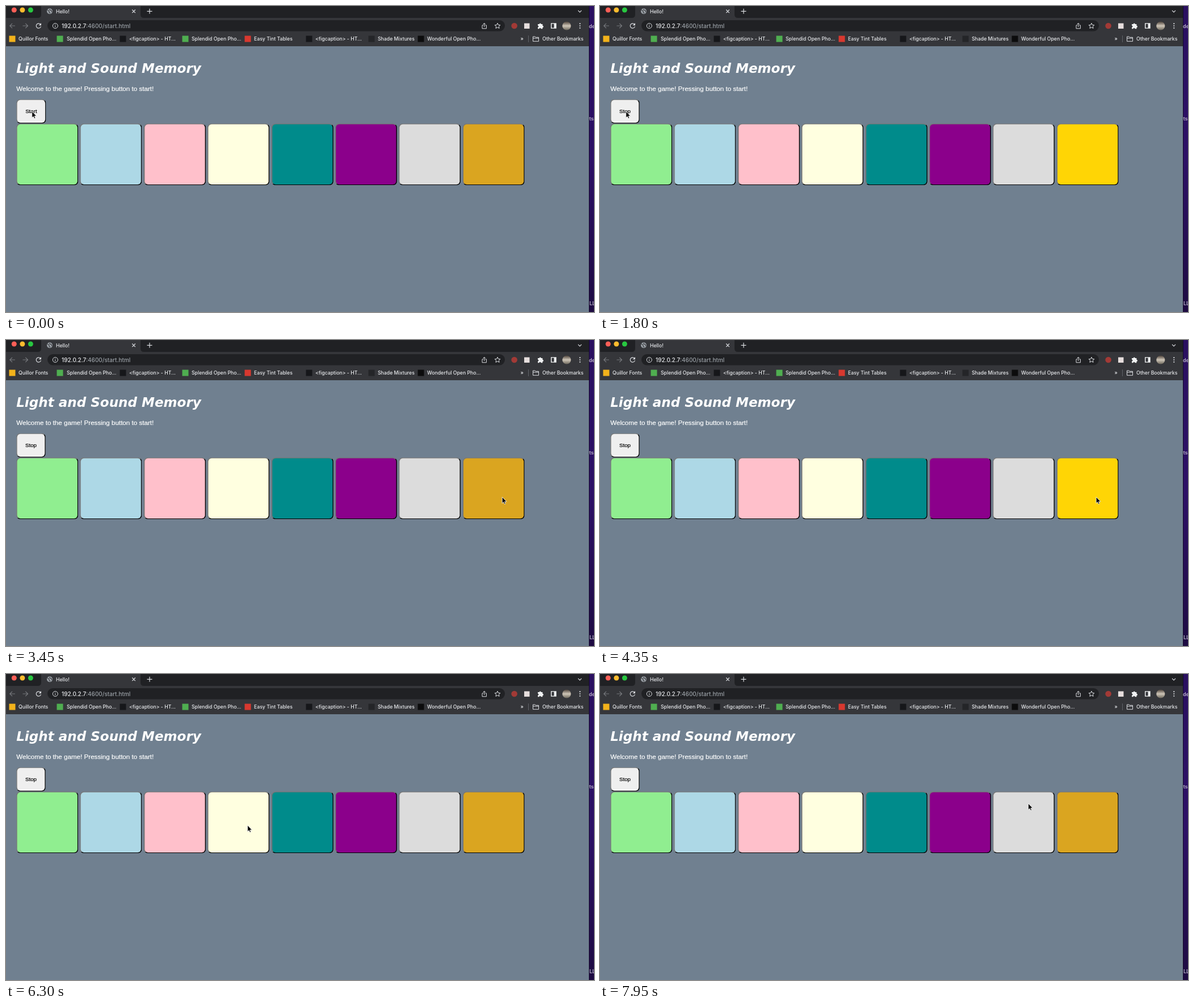
These frames come from a looping animation (1036 px wide and 540 px high, 8000 ms). An HTML page:

```html
<!DOCTYPE html>
<html lang="en">
<head>
<meta charset="utf-8">
<title>Hello!</title>
<style>
  html, body { margin: 0; width: 100%; height: 100%; overflow: hidden; background: #708090; }
  svg { position: absolute; left: 0; top: 0; }
  .ui { font: 500 8.7px Inter, sans-serif; fill: #e8eaed; }
  .line { fill: none; stroke: #dadce0; stroke-width: 1.2; }
  .dim { stroke: #77797d; }
  #game { position: absolute; left: 0; top: 0; transform: scale(.7275); transform-origin: 0 0; }
  .key {
    position: absolute; left: 25px; box-sizing: border-box; border: 2px solid; border-radius: 10px;
    border-color: #767676 #000 #000 #767676;
    display: flex; align-items: center; justify-content: center;
    font: 13.33px "Liberation Sans", Arial, sans-serif; -webkit-text-stroke: .25px #000;
    color: #000; background: #efefef;
  }
  .key.pressed { border-color: #000 #767676 #767676 #000; }
  .tile { width: 150px; height: 150px; top: 284.8px; }
  #toggle { top: 225.8px; height: 59px; }
</style>
</head>
<body>
<svg width="1036" height="540" viewBox="0 0 1036 540">
  <defs>
    <linearGradient id="desk" x2="0" y2="1">
      <stop stop-color="#2a1060"/><stop offset=".5" stop-color="#2d1166"/><stop offset="1" stop-color="#1e0b42"/>
    </linearGradient>
    <linearGradient id="photo" x2="0" y2="1">
      <stop stop-color="#4b4038"/><stop offset=".5" stop-color="#cfc6b8"/><stop offset="1" stop-color="#6d675c"/>
    </linearGradient>
  </defs>
  <rect width="1036" height="540" fill="url(#desk)"/>
  <rect x="1027" width="1" height="540" fill="#150a2c"/>
  <rect y="71" width="1027" height="469" fill="#708090"/>
  <rect width="1027" height="22" fill="#202124"/>
  <rect y="21" width="1027" height="50" fill="#35363a"/>
  <path d="M56 21q6 0 6-6V0H237V15q0 6 6 6z" fill="#35363a"/>
  <rect x="73" y="25" width="806" height="19.5" rx="9.75" fill="#202124"/>
  <circle cx="14.3" cy="7" r="4.5" fill="#ff5f57"/>
  <circle cx="28.9" cy="7" r="4.5" fill="#febc2e"/>
  <circle cx="43.4" cy="7" r="4.5" fill="#28c840"/>

  <!-- tab strip -->
  <circle cx="77" cy="9.3" r="5" fill="#9aa0a6"/>
  <path d="M73 7l3 2v2l2 2M77 5v2l3 1 1 3" fill="none" stroke="#35363a" stroke-width="1.1"/>
  <path class="line" d="M222.3 6.5l5.6 5.6M227.9 6.5l-5.6 5.6M248.5 9.3h9M253 4.8v9M1008 7.8l3 3 3-3"/>

  <!-- toolbar -->
  <path class="line dim" d="M16 35H7M11 30.8L6.8 35l4.2 4.2M29.5 35h9M34.3 30.8l4.2 4.2-4.2 4.2"/>
  <path class="line" d="M60.6 32.2a4.2 4.2 0 1 0 .9 3.9"/>
  <path d="M62 30v4.2h-4.2z" fill="#dadce0"/>
  <circle class="line" cx="86.8" cy="35" r="4.5" style="stroke-width:1"/>
  <path class="line" style="stroke-width:1" d="M86.8 34.4v3M86.8 32.3v1.1M841 34h-2v5.8h7.4V34h-2M842.7 37v-6.6M840.5 32.4l2.2-2.2 2.2 2.2"/>
  <path class="line" style="stroke-width:1" d="M866 30.2l1.4 3.2 3.5.3-2.6 2.3.8 3.4-3.1-1.8-3.1 1.8.8-3.4-2.6-2.3 3.5-.3z"/>
  <circle cx="895.6" cy="35" r="5.3" fill="#a23a36"/>
  <rect x="913" y="30.5" width="9.5" height="9.5" fill="#e6dedd"/>
  <path d="M937 32h2.6a1.6 1.6 0 1 1 3.2 0h2.6v2.7a1.6 1.6 0 1 1 0 3.2v2.4h-2.9a1.5 1.5 0 0 0-3 0H937v-2.7a1.5 1.5 0 0 0 0-3z" fill="#f1f3f4"/>
  <path d="M960 30.2h9.7v9.6H960zM961.4 31.6v6.8h4.2v-6.8z" fill="#f1f3f4" fill-rule="evenodd"/>
  <circle cx="987.8" cy="35" r="7.6" fill="url(#photo)"/>
  <g fill="#dadce0"><circle cx="1011.3" cy="31.2" r="1.1"/><circle cx="1011.3" cy="35" r="1.1"/><circle cx="1011.3" cy="38.8" r="1.1"/></g>

  <g class="ui">
    <text x="88" y="12.5">Hello!</text>
    <text x="98" y="38.5" style="font-size:10px">192.0.2.7<tspan fill="#9aa0a6">:4600/start.html</tspan></text>
    <g id="bookmarks"></g>
    <text x="906.5" y="61">»</text>
    <text x="945" y="61">Other Bookmarks</text>
  </g>
  <path d="M920.5 52v12" stroke="#5f6368"/>
  <path class="line" style="stroke-width:1" d="M928.5 54h3.6l1.2 1.3h5.2v7h-10zM928.5 57h10"/>

  <!-- window behind -->
  <g font-family="Inter, sans-serif" font-size="9" font-weight="600" fill="#b9b2c8">
    <text x="1027" y="39">de</text><text x="1027.5" y="202">ts</text><text x="1028" y="528">LL</text>
  </g>

  <text x="18.2" y="118" fill="#fff" font-family="'DejaVu Sans', Verdana, sans-serif" font-size="23.05" font-weight="bold" font-style="italic">Light and Sound Memory</text>
  <text x="18.2" y="150" fill="#fff" stroke="#fff" stroke-width=".2" font-family="'Liberation Sans', Arial, sans-serif" font-size="11.64">Welcome to the game! Pressing button to start!</text>
</svg>

<div id="game"><div id="toggle" class="key"></div></div>

<svg width="1036" height="540" viewBox="0 0 1036 540">
  <path id="pointer" d="M0 0V11.2L2.5 8.9 4.1 12.6 6 11.8 4.4 8.2H7.9Z" fill="#000" stroke="#fff" stroke-width=".8"/>
</svg>

<script>
const LOOP = 8000, GOLD = 7, YELLOW = 3;
const byId = id => document.getElementById(id);

const bookmarks = [
  [11, 22, "#f2b21b", "Quillor Fonts"],
  [95, 107, "#4fae50", "Splendid Open Pho..."],
  [206, 217, "#16171a", "<figcaption> - HT..."],
  [316, 327, "#4fae50", "Splendid Open Pho..."],
  [426, 437, "#d8382f", "Easy Tint Tables"],
  [534, 545, "#16171a", "<figcaption> - HT..."],
  [644, 655, "#242528", "Shade Mixtures"],
  [731, 742, "#0c0c0d", "Wonderful Open Pho..."],
];

function addSvg(parent, tag, attributes, text = "") {
  const node = document.createElementNS("http://www.w3.org/2000/svg", tag);
  for (const name in attributes) node.setAttribute(name, attributes[name]);
  node.textContent = text;
  parent.append(node);
}

for (const [iconX, textX, fill, label] of bookmarks) {
  addSvg(byId("bookmarks"), "rect", { x: iconX - 5.5, y: 52.5, width: 11, height: 11, fill });
  addSvg(byId("bookmarks"), "text", { x: textX, y: 61 }, label);
}

const colors = ["lightgreen", "lightblue", "pink", "lightyellow", "darkcyan", "darkmagenta", "gainsboro", "goldenrod"];
const tiles = colors.map((color, i) => {
  const tile = document.createElement("div");
  tile.className = "key tile";
  tile.style.left = 25 + 154.4 * i + "px";
  byId("game").append(tile);
  return tile;
});

// Each span is [from, to) in milliseconds.
const lit = {
  [GOLD]: [[1800, 2400], [3300, 3450], [4350, 4800], [5250, 5400], [7500, 7950]],
  [YELLOW]: [[5250, 5700], [6450, 6600]],
};
const pressed = {
  [GOLD]: [[3300, 3450], [5250, 5400]],
  [YELLOW]: [[6450, 6600]],
};
const litColor = { [GOLD]: "#ffd505", [YELLOW]: "#ffff00" };

// The pointer is sampled in hard steps: [time, x, y].
const pointerStops = [
  [0, 45.8, 186],
  [2550, 190, 212], [2700, 560, 275], [2850, 880, 318], [3000, 924, 325],
  [3150, 874.8, 278], [3300, 874.2, 277],
  [5550, 850, 274], [5700, 715, 267], [5850, 550, 263], [6000, 455, 264],
  [6150, 430, 266], [6300, 425.6, 267],
  [7950, 754.6, 228.5],
];

const active = (spans, t) => spans.some(([from, to]) => t >= from && t < to);

function render(t) {
  const started = t >= 900;
  const toggle = byId("toggle");
  toggle.textContent = started ? "Stop" : "Start";
  toggle.style.width = started ? "71px" : "72px";
  toggle.classList.toggle("pressed", active([[750, 900]], t));

  tiles.forEach((tile, i) => {
    tile.style.backgroundColor = active(lit[i] || [], t) ? litColor[i] : colors[i];
    tile.classList.toggle("pressed", active(pressed[i] || [], t));
  });

  const [, x, y] = pointerStops.filter(([from]) => from <= t).pop();
  byId("pointer").setAttribute("transform", `translate(${x} ${y})`);
}

function tick() {
  render(performance.now() % LOOP);
  requestAnimationFrame(tick);
}
tick();
</script>
</body>
</html>
```
